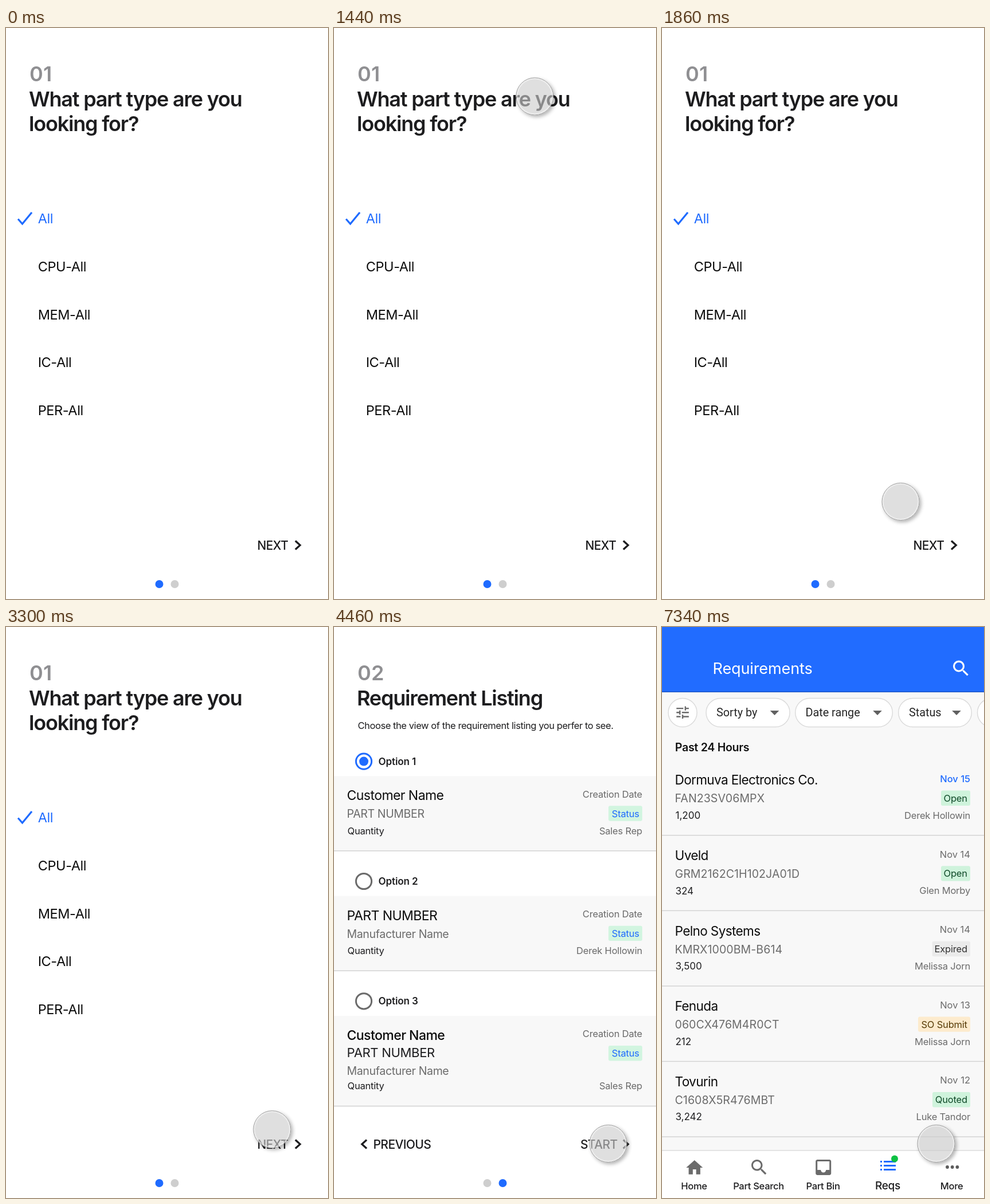
An HTML page that plays this animation: 562 px wide and 997 px high, repeating every 8000 ms.

```html
<!DOCTYPE html>
<html lang="en">
<head>
<meta charset="utf-8">
<title>Requirement setup</title>
<style>
  html, body { margin: 0; width: 100%; height: 100%; overflow: hidden; background: #fff; }
  svg { display: block; position: absolute; left: 0; top: 0; }
  text { font-family: Inter, "Open Sans", sans-serif; white-space: pre; }
  .chip { font-family: Roboto, sans-serif; }
  #cursor {
    position: absolute; left: -33px; top: -33px; width: 66px; height: 66px;
    box-sizing: border-box; border-radius: 50%; border: 1.7px solid #9b9b9b;
    background: rgba(204, 204, 204, .62); background-clip: padding-box;
    box-shadow: inset 0 0 1px 2px rgba(255, 255, 255, .5), 3px 3px 6px rgba(0, 0, 0, .3);
  }
  #cursor.down {
    box-shadow: inset 0 0 1px 2px rgba(255, 255, 255, .5), 1px 1px 3px rgba(0, 0, 0, .28);
  }
</style>
</head>
<body>
<svg id="stage" width="562" height="997" viewBox="0 0 562 997" xmlns="http://www.w3.org/2000/svg"></svg>
<div id="cursor"></div>
<script>
const LOOP = 8000;
const BLUE = '#1f6bff', INK = '#1d1d1f', GRAY = '#6b6b6b', MINT = '#d2f5e0';

// Drawing helpers return SVG markup
const text = (x, y, str, size, o = {}) =>
  `<text x="${x}" y="${y}" font-size="${size}" fill="${o.fill || INK}" font-weight="${o.weight || 400}"` +
  ` letter-spacing="${o.ls || 0}" text-anchor="${o.anchor || 'start'}" class="${o.cls || ''}">${str}</text>`;
const rect = (x, y, w, h, fill, extra = '') =>
  `<rect x="${x}" y="${y}" width="${w}" height="${h}" fill="${fill}" ${extra}/>`;
const disc = (x, y, r, fill, extra = '') =>
  `<circle cx="${x}" cy="${y}" r="${r}" fill="${fill}" ${extra}/>`;
const line = (d, color, w) =>
  `<path d="${d}" fill="none" stroke="${color}" stroke-width="${w}"/>`;
const icon = (x, y, scale, d, fill) =>
  `<path transform="translate(${x} ${y}) scale(${scale})" d="${d}" fill="${fill}"/>`;

const SEARCH = 'M15.5 14h-.79l-.28-.27C15.41 12.59 16 11.11 16 9.5 16 5.91 13.09 3 9.5 3S3 5.91 3 9.5 5.91 16 9.5 16c1.61 0 3.09-.59 4.23-1.57l.27.28v.79l5 4.99L20.49 19zm-6 0C7.01 14 5 11.99 5 9.5S7.01 5 9.5 5 14 7.01 14 9.5 11.99 14 9.5 14z';
const TUNE = 'M3 17v2h6v-2zM3 5v2h10V5zm10 16v-2h8v-2h-8v-2h-2v6zM7 9v2H3v2h4v2h2V9zm14 4v-2H11v2zm-6-4h2V7h4V5h-4V3h-2z';
const HOME = 'M10 20v-6h4v6h5v-8h3L12 3 2 12h3v8z';
const TRAY = 'M19 3H5c-1.1 0-2 .9-2 2v14c0 1.1.9 2 2 2h14c1.1 0 2-.9 2-2V5c0-1.1-.9-2-2-2zm0 12h-4c0 1.66-1.35 3-3 3s-3-1.34-3-3H5V5h14z';

const title = (y, str) => text(40, y, str, 36, { weight: 600, ls: -1.2 });
const step = str => text(41, 93, str, 36, { weight: 600, ls: .3, fill: '#8f8f92' });
const next = (x, str) =>
  text(x, 910.5, str, 21, { weight: 500, ls: -.6 }) + line('M505 895.5L513.3 903L505 910.5', INK, 3.2);
const pager = active => [267.5, 294.5]
  .map((x, i) => disc(x, 971, 7, i === active ? BLUE : '#cecece')).join('');

function typePage() {
  const items = ['All', 'CPU-All', 'MEM-All', 'IC-All', 'PER-All'];
  return rect(0, 0, 562, 997, '#fff') + step('01') +
    title(137, 'What part type are you') + title(180, 'looking for?') +
    line('M21 333.5L28.5 342L45 322', BLUE, 3.2) +
    items.map((s, i) =>
      text(55.7, 341.3 + i * 83.6, s, 23.5, { ls: -.4, fill: i ? '#0c0c0c' : BLUE })).join('') +
    next(438.5, 'NEXT') + pager(0);
}

const right = (y, str, o = {}) =>
  text(538, y, str, 16.5, { anchor: 'end', ls: -.2, fill: GRAY, ...o });

function badge(y, w, str, fill, color) {
  return rect(538 - w, y - 13.2, w, 26.4, fill, 'rx="3"') +
    right(y + 6, str, { fill: color }).replace('x="538"', 'x="532.8"');
}

const big = (y, str, weight = 400) => text(22.5, y, str, 23, { ls: -.55, weight, fill: '#0c0c0c' });
const dim = (y, str) => text(22.5, y, str, 19.5, { ls: -.35, fill: GRAY });

function option(n, y, h, rep, lines) {
  const cy = y - 25.7, on = n === 1, foot = y + h - 28.7;
  return disc(52, cy, 13.6, 'none', `stroke="${on ? BLUE : GRAY}" stroke-width="3"`) +
    (on ? disc(52, cy, 8, BLUE) : '') +
    text(77.5, cy + 6.1, 'Option ' + n, 17, { weight: 600, ls: -.1 }) +
    rect(0, y, 562, h, '#f8f8f8') + rect(0, y + h - .2, 562, 1.5, '#d2d2d2') +
    lines(y) + text(23.5, foot, 'Quantity', 16.5, { ls: -.2 }) +
    right(y + 37.3, 'Creation Date') + right(foot, rep);
}

function listingPage() {
  return rect(0, 0, 562, 997, '#fff') + step('02') + title(137, 'Requirement Listing') +
    text(41.5, 178, 'Choose the view of the requirement listing you perfer to see.', 16.5, { ls: -.43 }) +
    option(1, 260.3, 130, 'Sales Rep', y =>
      big(y + 42, 'Customer Name') + dim(y + 72.8, 'PART NUMBER') +
      badge(y + 65.2, 59, 'Status', MINT, BLUE)) +
    option(2, 469.7, 130, 'Derek Hollowin', y =>
      big(y + 42, 'PART NUMBER') + dim(y + 72.8, 'Manufacturer Name') +
      badge(y + 65.2, 59, 'Status', MINT, BLUE)) +
    option(3, 679, 157, 'Sales Rep', y =>
      big(y + 42, 'Customer Name', 500) +
      text(22.5, y + 72, 'PART NUMBER', 22, { ls: -.3 }) +
      dim(y + 103, 'Manufacturer Name') +
      badge(y + 65.2, 59, 'Status', MINT, BLUE)) +
    line('M57 895.5L48.7 903L57 910.5', INK, 3.2) +
    text(68.5, 910.5, 'PREVIOUS', 21, { weight: 500, ls: -.6 }) +
    next(430, 'START') + pager(1);
}

const BADGES = {
  'Open': [51, '#cff3dc', '#0f4a28'],
  'Expired': [66.5, '#ebebeb', '#333'],
  'SO Submit': [91, '#fdebcd', '#573b06'],
  'Quoted': [66, '#cff3dc', '#0f4a28']
};
const ROWS = [
  ['Dormuva Electronics Co.', 'FAN23SV06MPX', '1,200', 'Nov 15', 'Open', 'Derek Hollowin'],
  ['Uveld', 'GRM2162C1H102JA01D', '324', 'Nov 14', 'Open', 'Glen Morby'],
  ['Pelno Systems', 'KMRX1000BM-B614', '3,500', 'Nov 14', 'Expired', 'Melissa Jorn'],
  ['Fenuda', '060CX476M4R0CT', '212', 'Nov 13', 'SO Submit', 'Melissa Jorn'],
  ['Tovurin', 'C1608X5R476MBT', '3,242', 'Nov 12', 'Quoted', 'Luke Tandor']
];

function row([name, part, qty, date, status, rep], i) {
  const y = 267 + i * 131.6;
  const [w, fill, color] = BADGES[status];
  return text(22.5, y + 8.3, name, 22.5, { ls: -.6, fill: '#0c0c0c' }) +
    text(22.5, y + 39.3, part, 19.5, { ls: .1, fill: GRAY }) +
    text(23.5, y + 68, qty, 17) +
    right(y + 4, date, i ? { ls: 0 } : { ls: 0, fill: BLUE, weight: 500 }) +
    badge(y + 31.8, w, status, fill, color) + right(y + 67.8, rep) +
    rect(0, y + 96, 562, 1.4, '#d2d2d2');
}

function chip(x, w, str, tx, ax) {
  return rect(x, 124.5, w, 50, '#fff', 'rx="25" stroke="#dadada" stroke-width="1.4"') +
    (str ? text(tx, 156, str, 19.8, { cls: 'chip', fill: '#262626' }) +
      `<path d="M${ax} 146h15.6l-7.8 8z" fill="#616161"/>` : '');
}

function requirementsPage() {
  const tab = (x, str, size = 16.5) =>
    text(x, 982, str, size, { anchor: 'middle', weight: 500, ls: -.3 });
  const bars = [933.5, 940.5, 947.5]
    .map(y => rect(381, y - 1.5, 3, 3, BLUE) + rect(387, y - 1.5, 21, 3, BLUE)).join('');
  return rect(0, 0, 562, 997, '#f8f8f8') + rect(0, 0, 562, 113, '#216cff') +
    rect(0, 112.6, 562, 1.4, '#1c55c4') +
    text(88.5, 82, 'Requirements', 27, { fill: '#fff', ls: -.1 }) +
    icon(503.5, 54, 1.53, SEARCH, '#fff') +
    chip(11, 50) + icon(21.6, 134.9, 1.2, TUNE, GRAY) +
    chip(77, 146, 'Sorty by', 95, 188.7) + chip(232.7, 169.6, 'Date range', 250.5, 368.2) +
    chip(412.7, 127.6, 'Status', 431, 506.2) + chip(550.5, 120) +
    text(22.8, 216.6, 'Past 24 Hours', 19.5, { weight: 600, ls: -.25, fill: '#111' }) +
    ROWS.map(row).join('') +
    rect(0, 914, 562, 83, '#fff') + rect(0, 913.4, 562, 1.3, '#d8d8d8') +
    icon(39.3, 926.7, 1.45, HOME, GRAY) + icon(151.5, 925.5, 1.5, SEARCH, GRAY) +
    icon(263.7, 925.5, 1.5, TRAY, GRAY) + bars + disc(406, 928.5, 6, '#0dc143') +
    [498, 506.7, 515.4].map(x => disc(x, 943, 2.9, '#5c5c5c')).join('') +
    tab(56, 'Home') + tab(168.5, 'Part Search') + tab(281, 'Part Bin') +
    tab(394, 'Reqs', 19) + tab(505.5, 'More');
}

const stage = document.getElementById('stage');
const cursor = document.getElementById('cursor');
stage.innerHTML = [typePage, listingPage, requirementsPage].map(p => `<g>${p()}</g>`).join('');
const pages = [...stage.children];

const span = (t, a, b) => Math.min(1, Math.max(0, (t - a) / (b - a)));
const mix = (a, b, k) => a + (b - a) * k;
const inOut = u => u < .5 ? 4 * u ** 3 : 1 - 4 * (1 - u) ** 3;
const out = u => Math.sin(u * Math.PI / 2);
const bezier = (a, b, c, s) => mix(mix(a, b, s), mix(b, c, s), s);

function cursorAt(t) {
  if (t < 3180) {
    const s = inOut(span(t, 1140, 1860));
    return [bezier(310, 385.5, 416.5, s), bezier(-15, 136, 827, s)];
  }
  const reach = out(span(t, 3180, 3400)), settle = out(span(t, 3700, 3820));
  return [mix(416.5, 479.5, reach) - settle, mix(827, 893, reach) + 9 * settle];
}

function draw(t) {
  const page = t < 4460 ? 0 : t < 7340 ? 1 : 2;
  pages.forEach((g, i) => g.style.display = i === page ? '' : 'none');
  const [x, y] = cursorAt(t);
  const down = t >= 4120 && t < 4420 || t >= 7160 && t < 7300;
  cursor.className = down ? 'down' : '';
  cursor.style.display = t < 1160 ? 'none' : '';
  cursor.style.transform = `translate(${x}px, ${y}px)`;
}

const start = performance.now();
function tick() {
  draw((performance.now() - start) % LOOP);
  requestAnimationFrame(tick);
}
tick();
</script>
</body>
</html>
```
